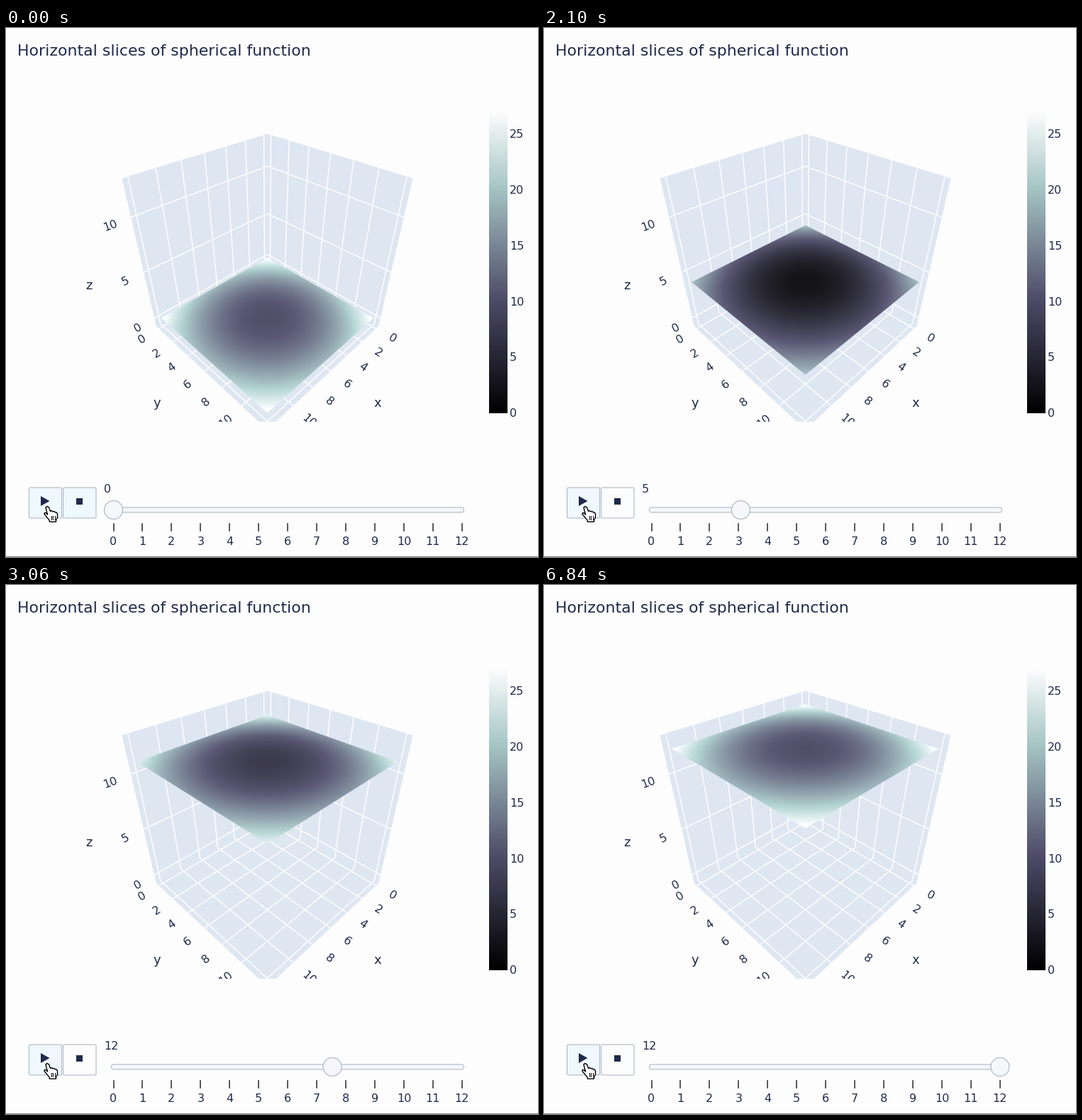
Animation, 750 px wide and 747 px high, one loop 6.94 s. Source, as a matplotlib script:

```python
import numpy as np
import matplotlib.pyplot as plt
from matplotlib.animation import FuncAnimation
from matplotlib.collections import LineCollection
from matplotlib.patches import Circle, FancyBboxPatch, Polygon, Rectangle

W, H, DPI = 750, 747, 100
PX = 72 / DPI
PAPER, INK, WALL = "#fdfdfd", "#1f2a4a", "#dee6f2"
TINT, RAIL, EDGE = "#eff8fd", "#f5f7fb", "#aeb8c8"

plt.rcParams["font.family"] = "DejaVu Sans"
fig = plt.figure(figsize=(W / DPI, H / DPI), dpi=DPI, facecolor=PAPER)


def stage():
    ax = fig.add_axes([0, 0, 1, 1])
    ax.set(xlim=(0, W), ylim=(H, 0))
    ax.axis("off")
    return ax


def text(ax, x, y, s, size=16, ha="center", rot=0, **kw):
    """Text whose digits are centred vertically on y, also when rotated."""
    a, drop = np.radians(rot), 0.36 * size
    return ax.text(x + drop * np.sin(a), y + drop * np.cos(a), s, color=INK,
                   fontsize=size * PX, ha=ha, va="baseline", rotation=rot,
                   rotation_mode="anchor", **kw)


def rounded(ax, x, y, w, h, r, fill, edge):
    box = FancyBboxPatch((x, y), w, h, fc=fill, ec=edge, lw=1.1 * PX,
                         boxstyle=f"round,pad=0,rounding_size={r}")
    return ax.add_patch(box)


# Perspective camera over a unit cube
EYE = np.full(3, 1.25)
AHEAD = np.ones(3) / np.sqrt(3)
RIGHT = np.array([-1, 1, 0]) / np.sqrt(2)
UP = np.array([-1, -1, 2]) / np.sqrt(6)
FOCAL, CX, CY, FLOOR = 544, 368.5, 330.5, 556
SPAN_XY, SPAN_Z = 12.8, 14


def project(*p):
    p = np.array(p, float)
    depth = (EYE - p) @ AHEAD
    return CX + FOCAL * (p @ RIGHT) / depth, CY - FOCAL * (p @ UP) / depth


def xy_unit(v):
    return (v - 6) / SPAN_XY


def z_unit(v):
    return (v - 6) / SPAN_Z


def bone(f):
    knots = [0, 0.376, 0.753, 1]
    chans = [(0, 78, 167, 253), (0, 75, 199, 253), (0, 104, 198, 253)]
    return np.stack([np.interp(f, knots, c) for c in chans], -1)


def draw_scene(ax):
    window = Rectangle((0, 105), W, FLOOR - 105, transform=ax.transData)
    h = 0.5
    outline = [(h, -h, h), (-h, -h, h), (-h, h, h),
               (-h, h, -h), (h, h, -h), (h, -h, -h)]
    box = ax.add_patch(Polygon([project(*p) for p in outline], fc=WALL, lw=0))
    box.set_clip_path(window)

    lines = []
    for v in range(0, 13, 2):
        c = xy_unit(v)
        lines += [[(c, h, -h), (c, -h, -h), (c, -h, h)],
                  [(h, c, -h), (-h, c, -h), (-h, c, h)]]
    for v in (0, 5, 10):
        c = z_unit(v)
        lines.append([(h, -h, c), (-h, -h, c), (-h, h, c)])
    grid = LineCollection([[project(*p) for p in ln] for ln in lines],
                          colors="white", lw=1.45 * PX)
    ax.add_collection(grid)
    grid.set_clip_path(window)

    spots = [(192, 438), (212, 458), (233, 478.5),
             (256, 502), (281, 527), (309, 554.5)]
    for k, (x, y) in enumerate(spots):
        tilt = 30 + 2.1 * k
        for px, rot in ((x, tilt), (2 * CX - x, -tilt)):
            label = text(ax, px, y, str(2 * k), rot=rot, clip_on=True)
            label.set_clip_path(window)
    for s, x, y, rot in (("0", 186, 423, 29), ("5", 168, 357, 25),
                         ("10", 147, 278, 20)):
        text(ax, x, y, s, rot=rot)
    for s, x, y in (("z", 116.5, 362.5), ("y", 213, 529), ("x", 523.5, 529)):
        text(ax, x, y, s, 18)


def draw_colorbar(ax):
    ramp = bone(np.linspace(1, 0, 425))[:, None] / 255
    ax.imshow(ramp, extent=(681, 707, 543.6, 118), aspect="auto")
    ax.set(xlim=(0, W), ylim=(H, 0))
    for v in range(0, 26, 5):
        text(ax, 710, 543.5 - 15.76 * v, str(v), ha="left")


def knob_x(v):
    return 151.5 + 40.95 * v


def draw_hand(ax, x, y):
    """Pointing hand with the fingertip at (x, y)."""
    shape = [(-2, 1.5), (0, 0), (2.5, 1.5), (4.5, 7), (6, 6), (8, 7.5),
             (9.7, 7), (11.5, 8.5), (13.1, 8.5), (14.5, 10.5), (14.5, 15.5),
             (12.5, 19.5), (12.5, 21.8), (3.5, 21.8), (3, 19.5), (-1, 14.5),
             (-4, 11), (-3.5, 9), (-1.5, 9.5), (0.7, 11.9), (-0.9, 6.5)]
    ax.add_patch(Polygon(np.array(shape) + (x, y), fc="white", ec="black",
                         lw=1.4 * PX, zorder=5))
    for dx in (5.8, 8.3, 10.8):
        ax.plot([x + dx] * 2, [y + 13.5, y + 18], color="black", lw=PX,
                zorder=6)


def draw_controls(ax):
    rounded(ax, 32.5, 649, 46, 43, 2, TINT, EDGE)
    ax.add_patch(Polygon([(49, 661), (49, 675), (61.5, 668)], fc=INK, lw=0))
    rounded(ax, 148.5, 677, 497, 7, 3.4, RAIL, EDGE)
    for v in range(13):
        x = knob_x(v)
        ax.plot([x, x], [700, 709.5], color="#333333", lw=1.6 * PX)
        text(ax, x, 724.5, str(v))
    draw_hand(ax, 58, 675.5)
    ax.plot([0, W], [745.5, 745.5], color="#858585", lw=PX)


def backdrop():
    ax = stage()
    text(ax, 15.5, 31, "Horizontal slices of spherical function", 22.05, "left")
    draw_scene(ax)
    draw_colorbar(ax)
    draw_controls(ax)
    fig.canvas.draw()
    pic = np.array(fig.canvas.buffer_rgba())[..., :3]
    fig.clear()
    return pic


def with_slice(pic, level):
    """Paint the horizontal slice z = level over the backdrop."""
    x0, x1, y0, y1 = 170, 570, 155, FLOOR
    sx, sy = np.meshgrid(np.arange(x0, x1) + 0.5, np.arange(y0, y1) + 0.5)
    z, e = z_unit(level), xy_unit(12)
    ray = (RIGHT * ((sx - CX) / FOCAL)[..., None]
           - UP * ((sy - CY) / FOCAL)[..., None] - AHEAD)
    t = (z - EYE[2]) / ray[..., 2]
    dx, dy = ((EYE[i] + t * ray[..., i]) * SPAN_XY for i in (0, 1))
    value = (dx**2 + dy**2 + (level - 6)**2) / 4
    # The light lifts every tone, so pale corners saturate
    color = np.minimum(bone(np.clip(value / 27, 0, 1)) + 12, 254)

    # Smooth edges: signed pixel distance to the four sides
    quad = [project(a, b, z) for a, b in ((e, e), (e, -e), (-e, -e), (-e, e))]
    mx, my = project(0, 0, z)
    cover = np.ones_like(sx)
    for (px, py), (qx, qy) in zip(quad, quad[1:] + quad[:1]):
        nx, ny = qy - py, px - qx
        n = np.hypot(nx, ny) * np.sign((mx - px) * nx + (my - py) * ny)
        dist = ((sx - px) * nx + (sy - py) * ny) / n
        cover = np.minimum(cover, np.clip(dist + 0.5, 0, 1))

    out = pic.copy()
    part = out[y0:y1, x0:x1]
    a = cover[..., None]
    part[:] = np.clip(part * (1 - a) + color * a, 0, 255).round()
    return out


# Moments (ms) at which the slider is sent to 1, 2, ... 12
CLICK = 760
STEPS = [780, 1160, 1560, 1990, 2085, 2225, 2370, 2510, 2640, 2770, 2900, 3025]
GLIDE, LAG = 360, 90


def ease(u):
    return 4 * u**3 if u < 0.5 else 1 - 4 * (1 - u)**3


def knob_pos(t):
    """Each step restarts the glide from wherever the knob is."""
    pos = 0.0
    for k, start in enumerate(STEPS, 1):
        if t <= start:
            break
        end = min(t, STEPS[k]) if k < len(STEPS) else t
        pos += (k - pos) * ease(min((end - start) / GLIDE, 1))
    return pos


def reached(t):
    return sum(t >= s for s in STEPS)


base = backdrop()
slices = [with_slice(base, k) for k in range(13)]

view = fig.figimage(slices[0], origin="upper", zorder=-1)
top = stage()
stop = rounded(top, 80.5, 649, 46.5, 43, 2, TINT, EDGE)
top.add_patch(Rectangle((99, 664), 9, 9, fc=INK, lw=0))
knob = top.add_patch(Circle((knob_x(0), 680.5), 13, fc=RAIL, ec=EDGE,
                            lw=1.2 * PX))
label = text(top, 138, 650.5, "0", ha="left")

TICK, COUNT = 20, 347


def update(i):
    # The picture refreshes three times per 140 ms: held 20, 100 and 20 ms
    cycle, phase = divmod(i, 7)
    held = 0 if phase == 0 else 1 if phase < 6 else 2
    t = (3 * cycle + held) * 140 / 3
    view.set_data(slices[reached(t - LAG)])
    label.set_text(str(reached(t)))
    knob.center = knob_x(knob_pos(t)), 680.5
    stop.set_facecolor(TINT if t < CLICK else PAPER)
    return view, label, knob, stop


anim = FuncAnimation(fig, update, frames=COUNT, interval=TICK,
                     repeat=True, repeat_delay=0, blit=False)
plt.show()
```
